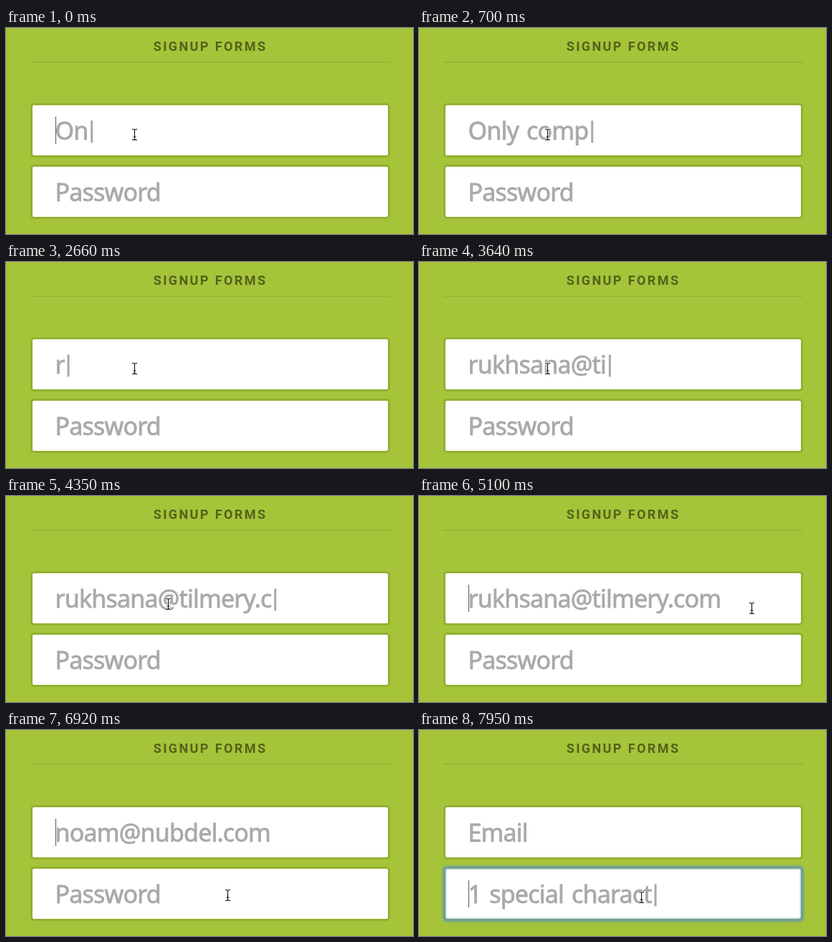
An HTML page for the animation above (8000 ms loop, 568 px wide and 288 px high).

```html
<!DOCTYPE html>
<html lang="en">
<head>
<meta charset="utf-8">
<title>Signup forms</title>
<style>
  html, body { margin: 0; width: 100%; height: 100%; overflow: hidden; background: #a5c43a; }
  svg { display: block; width: 568px; height: 288px; }
  .title { font: 700 18px Roboto, sans-serif; letter-spacing: 2.4px; fill: #52631a; }
  .box { fill: #fff; stroke: #94b031; stroke-width: 3; }
  .hint {
    font: 34px "Noto Sans", sans-serif; letter-spacing: -.8px; word-spacing: 3px; white-space: pre;
    fill: #a9a9a9; stroke: #a9a9a9; stroke-width: .8;
  }
  .bar { font-size: 30px; }
  .caret { fill: #555; }
  .ring { fill: none; stroke: #669cb0; stroke-width: 5; opacity: .75; filter: blur(.8px); }
  .beam { fill: none; stroke: #111; stroke-width: 1.1; }
  .halo { stroke: #fff; stroke-width: 3; }
</style>
</head>
<body>
<svg viewBox="0 0 568 288">
  <defs>
    <path id="ibeam" d="M-3.5-7.5h1.5q2 0 2 2V5.5q0 2-2 2h-1.5M3.5-7.5h-1.5q-2 0-2 2M0 5.5q0 2 2 2h1.5M-2 3h4"/>
  </defs>
  <rect width="568" height="288" fill="#a5c43a"/>
  <text class="title" x="205.7" y="31.5">SIGNUP FORMS</text>
  <rect x="34" y="47" width="502" height="1.5" fill="#96b233"/>
  <g id="email">
    <rect class="box" x="35.5" y="106.5" width="499" height="73" rx="3.5"/>
    <text class="hint" x="68.5" y="156" xml:space="preserve"><tspan class="text"></tspan><tspan class="bar" dx="-3" dy="-3">|</tspan></text>
    <rect class="caret" x="69" y="124" width="1" height="38"/>
  </g>
  <g id="password">
    <rect class="box" x="35.5" y="192.5" width="499" height="73" rx="3.5"/>
    <rect class="ring" x="35" y="192" width="500" height="74" rx="4"/>
    <text class="hint" x="68.5" y="242" xml:space="preserve"><tspan class="text"></tspan><tspan class="bar" dx="-3" dy="-3">|</tspan></text>
    <rect class="caret" x="69" y="210" width="1" height="38"/>
  </g>
  <g id="mouse" class="beam">
    <use href="#ibeam" class="halo"/>
    <use href="#ibeam"/>
  </g>
</svg>
<script>
  const LOOP = 8000, FOCUS = 7270, BLINK = 487;

  // start: time of the first letter, step: ms per letter
  const lines = [
    { start: -100, step: 100, text: 'Only company emails' },
    { start: 2660, step: 98, text: 'rukhsana@tilmery.com' },
    { start: 5525, step: 99.6, text: 'noam@nubdel.com' }
  ];
  const rule = { start: FOCUS, step: 42, text: '1 special character' };

  // time, x, y
  const path = [
    [4270, 179, 149], [4460, 300, 154], [4650, 410, 157], [4800, 410, 157],
    [5040, 464, 157], [5130, 464, 157], [5320, 474, 166], [5510, 467, 162],
    [5600, 467, 162], [6100, 421, 162], [6480, 421, 162], [6920, 309, 231],
    [7270, 309, 231], [7450, 310, 234]
  ];

  const field = id => {
    const el = document.getElementById(id);
    const [text, bar, caret, ring] = ['text', 'bar', 'caret', 'ring'].map(c => el.querySelector('.' + c));
    return { text, bar, caret, ring };
  };
  const email = field('email'), password = field('password');
  const mouse = document.getElementById('mouse');

  const show = (el, on) => el.style.display = on ? '' : 'none';

  function type(f, line, t) {
    const n = Math.max(1, Math.floor((t - line.start) / line.step) + 1);
    f.text.textContent = line.text.slice(0, n);
    show(f.bar, n < line.text.length);
  }

  function label(f, text) {
    f.text.textContent = text;
    show(f.bar, false);
  }

  function pointer(t) {
    const i = path.findIndex(p => p[0] > t);
    if (i === 0) return path[0].slice(1);
    if (i < 0) return path[path.length - 1].slice(1);
    const [a, b] = [path[i - 1], path[i]];
    const k = (t - a[0]) / (b[0] - a[0]), e = k * k * (3 - 2 * k);
    return [1, 2].map(j => Math.round(a[j] + (b[j] - a[j]) * e));
  }

  function draw(t) {
    const focused = t >= FOCUS;
    if (focused) {
      label(email, 'Email');
      type(password, rule, t);
    } else {
      type(email, lines.filter(l => l.start <= t).pop(), t);
      label(password, 'Password');
    }
    show(email.caret, !focused && Math.floor((t - 1880) / BLINK) % 2 === 0);
    show(password.caret, focused);
    show(password.ring, focused);
    const [x, y] = pointer(t);
    mouse.setAttribute('transform', `translate(${x + .5} ${y})`);
  }

  const began = performance.now();
  function tick() {
    draw((performance.now() - began) % LOOP);
    requestAnimationFrame(tick);
  }
  tick();
</script>
</body>
</html>
```
